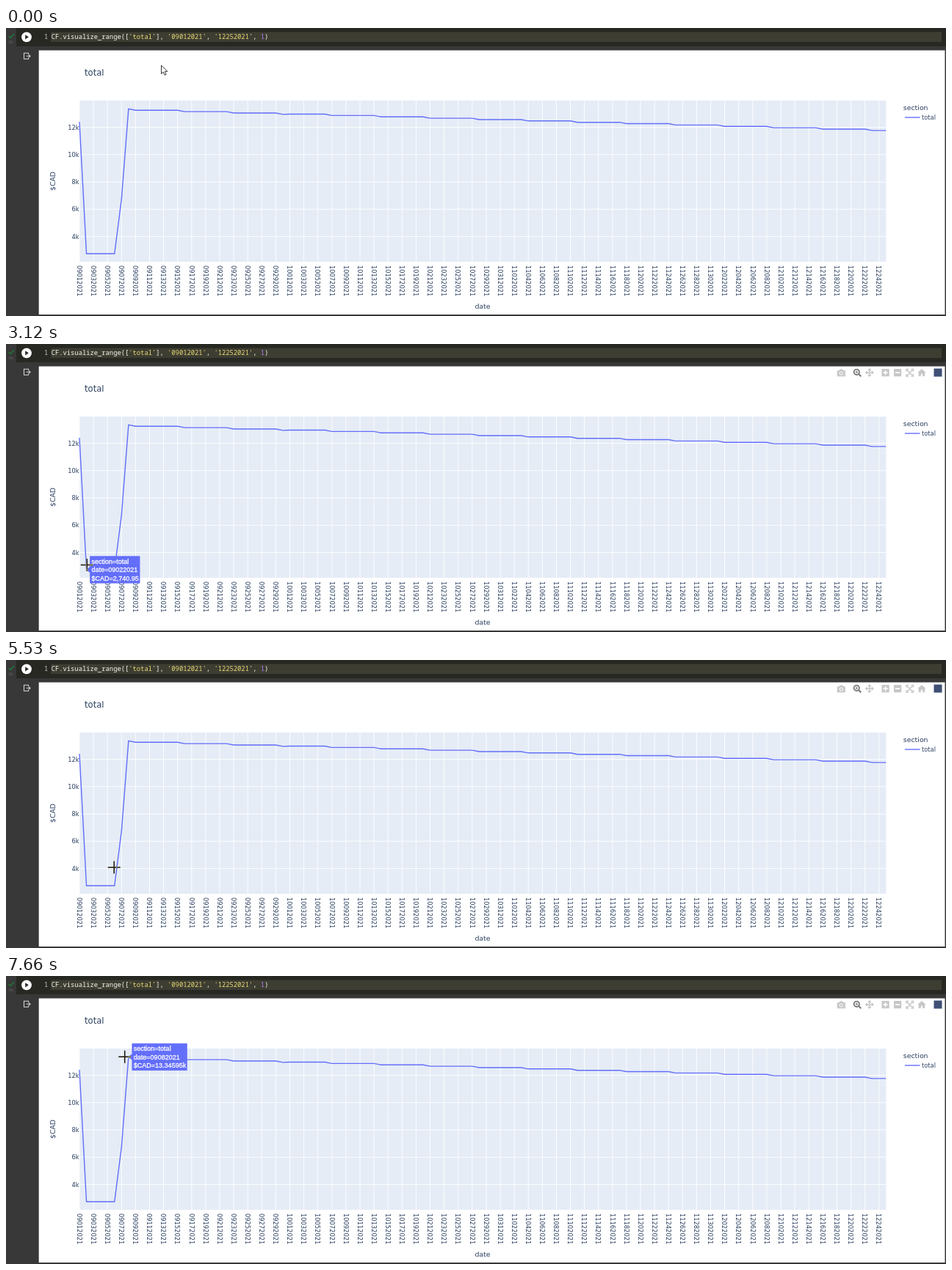
These frames come from a looping animation (1280 px wide and 393 px high, 8000 ms). An HTML page:

```html
<!DOCTYPE html>
<html lang="en">
<head>
<meta charset="utf-8">
<title>Range chart</title>
<style>
html, body { margin: 0; width: 100%; height: 100%; overflow: hidden; background: #383838; }
svg { display: block; width: 100%; height: 100%; }
.code { font: 8.8px "Noto Sans Mono", "DejaVu Sans Mono", monospace; fill: #f8f8f2; white-space: pre; }
.str { fill: #e6db74; }
.chart { font-family: "DejaVu Sans", sans-serif; font-size: 8.3px; fill: #2a3f5f; }
.axis { font-size: 9.4px; }
.tip { font: 9px "Liberation Sans", Arial, sans-serif; fill: #fff; stroke: #fff; stroke-width: .3px; }
.open { fill: none; stroke: #c7c7c7; stroke-width: 1.5px; }
#cross { mix-blend-mode: difference; }
</style>
</head>
<body>
<svg viewBox="0 0 1280 393">
  <rect width="1280" height="393" fill="#383838"/>
  <rect x="14" width="1266" height="25" fill="#272822"/>
  <rect x="61" y="5.5" width="1213" height="13.5" fill="#3e3d32"/>
  <path d="M3.5 11l2.5 2.5 5-5.5" fill="none" stroke="#1f7a35" stroke-width="1.3"/>
  <text x="3.5" y="21" font-family="DejaVu Sans, sans-serif" font-size="5.5" fill="#666">0s</text>
  <circle cx="28" cy="12.3" r="6.9" fill="#fff"/>
  <path d="M26.2 9.2v6.2l4.7-3.1z" fill="#272822"/>
  <text class="code" x="52" y="15.3" style="fill:#c3c3bb">1</text>
  <text class="code" x="61.7" y="15.3">CF.visualize_range([<tspan class="str">'total'</tspan>], <tspan class="str">'09012021'</tspan>, <tspan class="str">'12252021'</tspan>, <tspan fill="#ae81ff">1</tspan>)</text>
  <path d="M30.5 36v-1.7h-6v8h6v-1.7M27.5 38.3h5.5m-2-2l2 2-2 2" fill="none" stroke="#d5d5d5" stroke-width="1.1"/>

  <rect x="44.7" y="30.5" width="1233.8" height="360.5" fill="#fff"/>
  <rect x="100" y="99" width="1098.5" height="220" fill="#e5ecf6"/>
  <path id="grid" stroke="#fff" stroke-width=".9"/>
  <path id="line" fill="none" stroke="#636efa" stroke-width="1.4"/>
  <g id="labels" class="chart">
    <text x="107" y="65.2" font-size="11.6">total</text>
    <text class="axis" x="649" y="382.5" text-anchor="middle">date</text>
    <text class="axis" transform="translate(67.3 209) rotate(-90)" text-anchor="middle">$CAD</text>
    <text class="axis" x="1221.8" y="111.5">section</text>
    <text x="1247" y="124.8">total</text>
  </g>
  <path d="M1224 122h20.5" stroke="#636efa" stroke-width="1.4"/>

  <g id="bar" fill="#c7c7c7">
    <g transform="translate(1137.3 39)">
      <path d="M-5.6-2.8h2.6l1-1.800h4l1 1.800h2.600v8h-11.200z"/>
      <circle cy="1" r="2.200" fill="none" stroke="#fff"/>
    </g>
    <g transform="translate(1158.3 38.3)" fill="none" stroke="#7c7c7c">
      <circle r="3.7" stroke-width="1.8"/>
      <path d="M2.700 2.700l3.300 3.300" stroke-width="2.200"/>
      <path d="M-1.800 0h3.600M0-1.800v3.600"/>
    </g>
    <path class="open" transform="translate(1175.8 39)" d="M-5 0h10M0-5v10M-2-3l2-2 2 2M-2 3l2 2 2-2M-3-2l-2 2 2 2M3-2l2 2-2 2"/>
    <rect x="1192.500" y="34" width="10.200" height="10.200"/>
    <rect x="1209" y="34" width="10.200" height="10.200"/>
    <path d="M1194.500 39.100h6.200m-3.100-3.100v6.200M1211 39.100h6.200" stroke="#fff" stroke-width="1.800"/>
    <path class="open" d="M1226 37.500v-3h3m3.500 0h3v3m0 3.500v3h-3m-3.500 0h-3v-3M1227.300 35.800l6.900 6.900m0-6.900l-6.900 6.900"/>
    <path d="M1247 34l5.700 5h-1.500v5h-3v-3.300h-2.400v3.300h-3v-5h-1.500z"/>
    <rect x="1263.500" y="33.500" width="11" height="11" fill="#3f4f75"/>
  </g>

  <g id="tip">
    <path id="tipBox" fill="#636efa" stroke="#636efa" stroke-width=".7"/>
    <text class="tip"></text><text class="tip"></text><text class="tip"></text>
  </g>
  <path id="arrow" d="M0 0v11.500l2.700-2.500 1.900 4.300 2-.9-1.900-4.100h3.700z" fill="#fff" stroke="#222" stroke-width=".9"/>
  <path id="cross" d="M-8.500 0h17M0-8.500v17" stroke="#fff" stroke-width="1.500"/>
</svg>
<script>
const $ = id => document.getElementById(id);
const LOOP = 8000, STEP = 100, DAYS = 116, REACH = 20, HOVER_FROM = 2200;

const xOf = i => 100 + i * 1098.3 / (DAYS - 1);
const yOf = v => 135.5 + (12000 - v) * 0.018625;
const dateOf = i => {
  const [, m, d] = new Date(Date.UTC(2021, 8, 1 + i)).toISOString().slice(0, 10).split('-');
  return m + d + '2021';
};
const valueOf = i => {
  if (i === 0) return 12398.48;
  if (i < 6) return 2740.95;
  if (i === 6) return 6740.95;
  // a weekly payment, plus a small credit in October
  return 13345.95 - 100 * Math.floor((i - 1) / 7) + (i > 29 ? 20 : 0);
};
const format = v => v >= 1e4
  ? (v / 1000).toFixed(5) + 'k'
  : v.toLocaleString('en-US', { minimumFractionDigits: 2 });

const points = Array.from({ length: DAYS }, (_, i) => ({ x: xOf(i), y: yOf(valueOf(i)) }));

function addLabel(text, attrs) {
  const el = document.createElementNS('http://www.w3.org/2000/svg', 'text');
  for (const key in attrs) el.setAttribute(key, attrs[key]);
  el.textContent = text;
  $('labels').append(el);
}

function drawChart() {
  let grid = '';
  for (let i = 0; i < DAYS; i += 2) {
    grid += `M${xOf(i)} 99V319`;
    addLabel(dateOf(i), { transform: `translate(${xOf(i) - 3.3} 324) rotate(90)` });
  }
  for (let k = 4; k <= 12; k += 2) {
    const y = yOf(k * 1000);
    grid += `M100 ${y}H1198.5`;
    addLabel(k + 'k', { x: 99.7, y: y + 3.1, 'text-anchor': 'end' });
  }
  $('grid').setAttribute('d', grid);
  $('line').setAttribute('d', 'M' + points.map(p => p.x + ' ' + p.y).join('L'));
}

// pointer moves: start time, number of steps, first and last place
const moves = [
  { at: 0, steps: 1, from: [211.5, 51], to: [211.5, 51] },
  { at: 390, steps: 8, from: [207, 55], to: [112, 148] },
  { at: 1200, steps: 2, from: [111.5, 143], to: [111.5, 134.3] },
  { at: 1400, steps: 3, from: [109, 139], to: [105.5, 148.5] },
  { at: 2200, steps: 8, from: [104.5, 146], to: [107, 297] },
  { at: 3020, steps: 2, from: [108.5, 300], to: [110.3, 301.5] },
  { at: 4320, steps: 4, from: [115, 302], to: [143.5, 303] },
  { at: 5430, steps: 5, from: [145, 297], to: [159, 207] },
  { at: 5930, steps: 2, from: [160, 225], to: [160.5, 245] },
  { at: 6130, steps: 2, from: [160, 248], to: [158.5, 248] },
  { at: 7140, steps: 6, from: [157.5, 240], to: [161.7, 110.3] }
];
const ease = f => f * f * (3 - 2 * f);

function pointerAt(t) {
  const { at, steps, from, to } = moves.findLast(m => m.at <= t);
  const k = Math.min(steps - 1, Math.floor((t - at) / STEP));
  const f = steps > 1 ? ease(k / (steps - 1)) : 0;
  return from.map((a, n) => a + (to[n] - a) * f);
}

function nearest(x, y) {
  const far = points.map(p => Math.hypot(p.x - x, p.y - y));
  const min = Math.min(...far);
  return min < REACH ? far.indexOf(min) : -1;
}

const lines = [...document.querySelectorAll('#tip text')];
const show = (id, on) => { $(id).style.display = on ? '' : 'none'; };

function showTip(i) {
  show('tip', i >= 0);
  if (i < 0) return;
  const { x, y } = points[i];
  const text = ['section=total', 'date=' + dateOf(i), '$CAD=' + format(valueOf(i))];
  lines.forEach((el, n) => {
    el.textContent = text[n];
    el.setAttribute('x', x + 7);
    el.setAttribute('y', y + 3.2 + (n - 1) * 11.6);
  });
  const w = Math.max(...lines.map(el => el.getComputedTextLength())) + 3.2;
  $('tipBox').setAttribute('d',
    `M${x} ${y}l5 -4V${y - 18.2}h${w}v36.4h${-w}V${y + 4}z`);
}

function render(t) {
  const [x, y] = pointerAt(t);
  const inPlot = y > 99;
  $('bar').style.opacity = Math.min(1, Math.max(0, (t - 390) / 300));
  show('arrow', !inPlot);
  show('cross', inPlot);
  $(inPlot ? 'cross' : 'arrow').setAttribute('transform', `translate(${x} ${y})`);
  showTip(t >= HOVER_FROM ? nearest(x, y) : -1);
}

drawChart();
const start = performance.now();
function tick() {
  render((performance.now() - start) % LOOP);
  requestAnimationFrame(tick);
}
tick();
</script>
</body>
</html>
```
